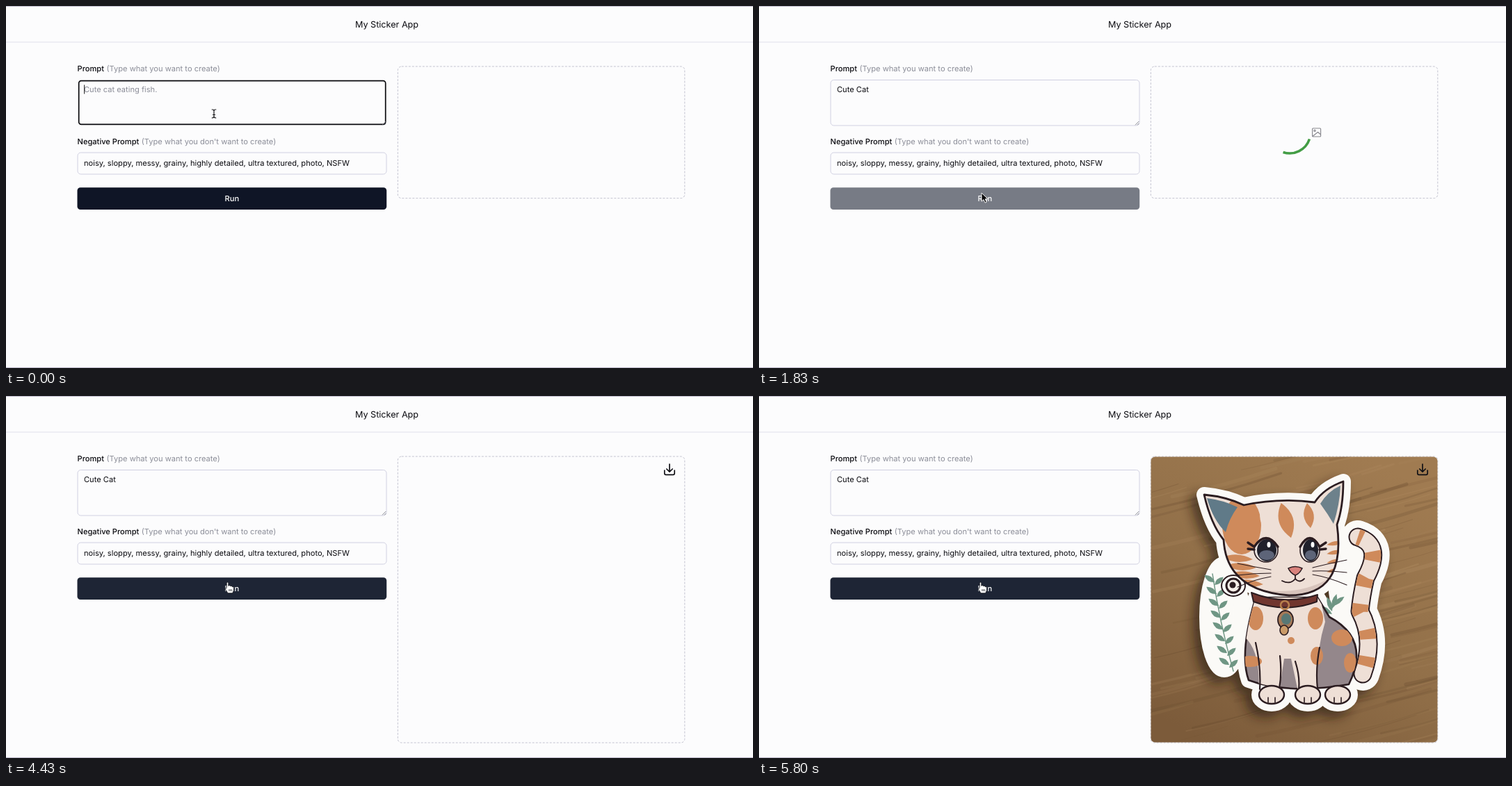
Write an HTML page that moves like this. It is 1074 px wide and 521 px high and loops after 5.83 s.

```html
<!DOCTYPE html>
<html lang="en">
<head>
<meta charset="utf-8">
<title>My Sticker App</title>
<style>
  html, body { margin: 0; width: 100%; height: 100%; overflow: hidden; background: #fcfcfd; }
  svg { display: block; width: 100vw; height: 100vh; }
  text { font: 400 11.12px Inter, "Liberation Sans", sans-serif; fill: #0b0b10; white-space: pre; text-rendering: geometricPrecision; }
  .title { font-size: 12.64px; }
  .label, .run { font-weight: 500; }
  .hint { fill: #8b8d98; }
  .run { fill: #fff; }
  .mid { text-anchor: middle; }
  .line { fill: none; stroke-linecap: round; stroke-linejoin: round; }
  .box { fill: none; stroke: #d0d0e1; }
</style>
</head>
<body>
<svg id="stage" viewBox="0 0 1074 521"></svg>
<script>
const LOOP = 5830;
const PROMPT = "Cute Cat";
const TYPE_START = 100, TYPE_END = 720;
const MOVE_START = 760, MOVE_END = 1082;
const CLICK = 1213, RESULT = 3320, IMAGE = 5040;
const SPIN = 475;

const INK = "#2b1c20", CREAM = "#eedfd6", ORANGE = "#cf8a5b", GREY = "#94878b", GREEN = "#6f9684";
const HEAD = "M640 142Q672 145 697 157Q748 146 799 153Q812 133 840 123Q840 160 831 185Q845 287 762 287Q672 280 668 207Q650 185 640 142Z";
const BODY = "M714 290Q690 370 704 409Q760 430 848 415Q880 350 820 318L803 290Z";
const TAIL = "M868 400Q886 350 864 310Q866 288 872 262Q898 215 861 203";
const PAWS = [737, 789, 832];

const path = (d, fill, extra = "") => `<path d="${d}" fill="${fill}" ${extra}/>`;
const line = (d, color, width, extra = "") =>
  `<path class="line" d="${d}" stroke="${color}" stroke-width="${width}" ${extra}/>`;
const oval = (x, y, rx, ry, fill, extra = "") =>
  `<ellipse cx="${x}" cy="${y}" rx="${rx}" ry="${ry}" fill="${fill}" ${extra}/>`;
const label = (x, y, cls, str) => `<text x="${x}" y="${y}" class="${cls}">${str}</text>`;
const repeat = (n, make) => Array.from({ length: n }, (_, i) => make(i)).join("");
const outline = w => `stroke="${INK}" stroke-width="${w}" stroke-linejoin="round"`;

// Pointed blade, used for leaves and fur stripes.
const blade = (x, y, angle, size, color, fat = 0.4) =>
  path(`M0 0Q${size / 2} ${-size * fat} ${size} 0Q${size / 2} ${size * fat} 0 0`, color,
    `transform="translate(${x} ${y}) rotate(${angle})"`);

function random(seed) {
  return () => (seed = (seed * 16807) % 2147483647) / 2147483647;
}

function wood() {
  const rnd = random(77);
  return `<rect x="563" y="87" width="413" height="412" fill="url(#wood)"/>` + repeat(110, () => {
    const x = 500 + rnd() * 440, y = 90 + rnd() * 500, w = 70 + rnd() * 180;
    const color = rnd() < 0.5 ? "#5e4329" : "#b8946a";
    return line(`M${x} ${y}q${w / 2} ${-w * 0.1} ${w} ${-w * 0.27}`, color, 1 + rnd() * 5,
      `opacity="${0.08 + rnd() * 0.18}"`);
  });
}

// The die-cut border is the cat's silhouette, widened.
function cutout(color, extra = "") {
  return `<g fill="${color}" stroke="${color}" stroke-width="22" stroke-linejoin="round" ${extra}>
    <path d="${HEAD}"/><path d="${BODY}"/>${line(TAIL, color, 48)}
    ${PAWS.map(x => oval(x, 430, 18, 13, color)).join("")}
    ${oval(669, 318, 25, 76, color)}${oval(845, 260, 16, 60, color)}</g>`;
}

function leaves() {
  const stem = repeat(8, i => blade(655 + i * 3, 268 + i * 17, 215, 18, GREEN) +
    blade(655 + i * 3, 272 + i * 17, -42, 17, GREEN));
  const sprig = repeat(4, i => blade(824, 314 - i * 4, 215 + i * 36, 22, GREEN, 0.3));
  return line("M652 256Q662 325 682 396", GREEN, 1.5) + stem + sprig;
}

function paw(x) {
  return oval(x, 430, 18, 13, CREAM, outline(2.4)) +
    repeat(2, i => line(`M${x - 5 + i * 10} 434v7`, INK, 1.6));
}

function body() {
  return line(TAIL, INK, 27) + line(TAIL, CREAM, 23) +
    line(TAIL, ORANGE, 23, `stroke-dasharray="14 25" stroke-dashoffset="-12" style="stroke-linecap:butt"`) +
    path(BODY, GREY, outline(2.6)) +
    `<g clip-path="url(#body)">` +
    oval(838, 348, 15, 12, ORANGE) + oval(850, 384, 9, 14, ORANGE) +
    path("M704 280L696 345Q722 365 718 425H748L755 378H765L775 425H803Q800 370 814 325L805 280Z", CREAM) +
    oval(714, 320, 11, 17, ORANGE) + oval(800, 320, 11, 16, ORANGE) +
    oval(802, 374, 9, 13, ORANGE) + oval(706, 382, 17, 8, ORANGE) + oval(765, 352, 5, 5, ORANGE) +
    `</g>` +
    line("M714 355Q722 390 720 422M749 374Q752 400 748 421M771 382Q778 404 776 422M806 362Q800 393 803 421", INK, 2.2) +
    PAWS.map(paw).join("");
}

function collar() {
  return path("M708 283Q755 302 803 286L802 296Q757 313 711 296Z", "#71362f", outline(2)) +
    oval(756, 301, 6, 6, "none", `stroke="#b8814c" stroke-width="2.5"`) +
    oval(757, 322, 11, 13, "#a67a58", outline(1.8)) + oval(758, 321, 7, 8, "#587875") +
    oval(755, 337, 6, 7, "#c99a68", outline(1.6));
}

function eye(x, rx, side) {
  return oval(x, 222, rx, 17, "#e9e2df", outline(1.6)) +
    oval(x + 1, 222, rx - 3, 16, "#20212c") + oval(x + 1, 229, rx - 6, 7, "#5d6478") +
    oval(x + 4, 214, 2.5, 4, "#fff") +
    line(`M${x - rx} 217Q${x} 192 ${x + rx} 217m0 0M${x + side * rx} 217l${side * 9} -6m${-side * 9} 10l${side * 9} -1`, INK, 3.4);
}

function whiskers() {
  return repeat(3, i => line(`M736 ${250 + i * 5}Q712 ${246 + i * 9} 688 ${241 + i * 17}` +
    `M796 ${247 + i * 5}Q820 ${241 + i * 10} 845 ${236 + i * 18}`, INK, 1.2));
}

function head() {
  return path(HEAD, CREAM) + `<g clip-path="url(#head)">` +
    oval(694, 186, 28, 42, ORANGE) +
    blade(765, 204, -106, 52, ORANGE) + blade(732, 196, -100, 40, CREAM) + blade(793, 190, -98, 36, ORANGE) +
    repeat(4, i => blade(666 + i * 5, 232 + i * 12, 4, 44, ORANGE, 0.24) + blade(840, 210 + i * 13, 170, 24, ORANGE, 0.24)) +
    line("M700 278Q770 298 826 264", "#c9b3ac", 9, `opacity=".6"`) + `</g>` +
    path("M644 147Q668 150 688 160Q676 176 671 196Q653 179 644 147Z", "#607a88") +
    path("M836 129Q818 137 807 155Q818 170 826 184Q835 156 836 129Z", "#6d818b") +
    path(HEAD, "none", outline(2.8)) +
    eye(729, 17, -1) + eye(792, 14, 1) +
    path("M761 248Q771 243 781 248Q777 256 771 258Q764 255 761 248Z", "#d9827c", outline(1.6)) +
    line("M771 258v5Q764 272 752 266M771 263Q777 270 784 263", INK, 1.8) + whiskers();
}

function sticker() {
  return cutout("#24150b", `opacity=".6" transform="translate(-9 9)" filter="url(#soft)"`) +
    cutout("#fbfaf7") + leaves() +
    oval(682, 273, 17, 15, "#fbfaf7", outline(2)) + oval(682, 273, 10, 10, "#f6eee8", outline(3)) +
    oval(681, 272, 4.5, 4.5, INK) + body() + collar() + head();
}

const stage = document.getElementById("stage");
stage.innerHTML = `
<defs>
  <linearGradient id="wood" x1=".75" y1="0" x2=".2" y2="1">
    <stop offset="0" stop-color="#a07b51"/><stop offset=".5" stop-color="#927049"/><stop offset="1" stop-color="#7c5b3a"/>
  </linearGradient>
  <filter id="soft" x="-20%" y="-20%" width="140%" height="140%"><feGaussianBlur stdDeviation="8"/></filter>
  <clipPath id="card"><rect x="563.5" y="87.5" width="412" height="411" rx="6"/></clipPath>
  <clipPath id="head"><path d="${HEAD}"/></clipPath>
  <clipPath id="body"><path d="${BODY}"/></clipPath>
</defs>
<rect width="1074" height="521" fill="#fcfcfd"/>
<path d="M0 .5H1074M0 520.5H1074" stroke="#bdb9cb"/>
<path d="M0 52H1074" stroke="#e1e2ec" stroke-width="1.2"/>
${label(547.5, 30.7, "title mid", "My Sticker App")}
${label(102.5, 94, "label", "Prompt")}
${label(144.5, 94, "hint", "(Type what you want to create)")}
${label(102.5, 199, "label", "Negative Prompt")}
${label(194.8, 199, "hint", "(Type what you don't want to create)")}
<rect id="field" class="box" x="103" y="106.5" width="444" height="65.5" rx="4.5"/>
<rect id="ring" x="104.7" y="107.7" width="441" height="62.6" rx="3.5" fill="none" stroke="#08080c" stroke-width="1.7"/>
<path d="M541 171.3L546.3 166M544 171.3L546.3 169" stroke="#777984" stroke-width=".9"/>
<text id="prompt" x="112" y="124"></text>
<path id="caret" d="M112.7 113.5V126.5" stroke="#111"/>
<rect class="box" x="103" y="211" width="444" height="31" rx="4.5"/>
${label(112, 230.3, "", "noisy, sloppy, messy, grainy, highly detailed, ultra textured, photo, NSFW")}
<rect id="button" x="102.5" y="261.3" width="444.7" height="31.8" rx="4.5"/>
${label(324.8, 281.2, "run mid", "Run")}
<rect id="panel" x="563.3" y="87" width="412.5" rx="5.5" fill="none" stroke="#c3c3d0" stroke-dasharray="3 2"/>
<g id="loader">
  <path id="arc" d="M784.2 160.8A30 30 0 0 1 784.2 203.2" fill="none" stroke="#439d45" stroke-width="3.6"/>
  <g class="line" stroke="#85858c" stroke-width="1.1">
    <rect x="795.6" y="176" width="12" height="12" rx="1"/>
    <circle cx="799" cy="179.6" r="1.2"/><path d="M796 187.5L803.5 181.5L807.5 185"/>
  </g>
</g>
<g id="image" clip-path="url(#card)">${wood()}${sticker()}</g>
<g id="save">${line("M954 98V109M949.8 105L954 109.2L958.2 105M946.8 107V111.2Q946.8 113.3 949 113.3H959Q961.2 113.3 961.2 111.2V107", "#111116", 1.7)}</g>
<g id="beam">${line("M-2.8 -6Q0 -6 0 -4Q0 -6 2.8 -6M0 -4V4M-2.8 6Q0 6 0 4Q0 6 2.8 6M-1.5 1.5H1.5", "#18181b", 1.2)}</g>
<g id="arrow"><path d="M0 0V12.2L2.9 9.6L5 14.2L7.2 13.2L5.2 8.8H9Z" fill="#060608" stroke="#fff" stroke-width=".9"/></g>
<g id="hand"><path d="M-2.8 6.6V.6Q-2.8 -1 -1.5 -1Q-.3 -1 -.2 .6V4.2Q1.8 2.8 2.6 4.6Q4.6 3.6 5.1 5.4Q7.4 4.9 7.4 7.2V10Q7 12.5 5.6 14.8H-1.2Q-2.4 11.8 -4.6 9.4Q-5.6 6.6 -2.8 8.2" fill="#fff" stroke="#15171e" stroke-width=".9"/><path d="M.8 9V12M2.6 9V12M4.4 9V12" stroke="#15171e" stroke-width=".7"/></g>`;

const el = {};
stage.querySelectorAll("[id]").forEach(node => el[node.id] = node);
const show = (name, on) => el[name].style.display = on ? "" : "none";
const progress = (t, from, to) => Math.max(0, Math.min(1, (t - from) / (to - from)));

// Eased move from the prompt field down to the button, along a shallow arc.
function pointer(t) {
  const v = progress(t, MOVE_START, MOVE_END);
  const u = v * v * (3 - 2 * v);
  const bend = (a, b, c) => (1 - u) ** 2 * a + 2 * u * (1 - u) * b + u * u * c;
  return [bend(299, 339, 320), bend(155, 235, 269)];
}

function draw(t) {
  const typed = Math.ceil(PROMPT.length * progress(t, TYPE_START, TYPE_END));
  const focused = t < CLICK;
  const done = t >= RESULT;
  const loading = !focused && !done;

  el.prompt.textContent = typed ? PROMPT.slice(0, typed) : "Cute cat eating fish.";
  el.prompt.setAttribute("class", typed ? "" : "hint");
  show("ring", focused);
  show("field", !focused);
  show("caret", t < 900);
  const end = typed ? el.prompt.getComputedTextLength() : 0;
  el.caret.setAttribute("transform", `translate(${end} 0)`);

  const [x, y] = pointer(t);
  const overButton = y > 261;
  const overField = y < 172 || (y > 211 && y < 242);
  const hidden = typed > 0 && t < MOVE_START;
  const kind = hidden ? "" : overField ? "beam" : overButton && !loading ? "hand" : "arrow";
  for (const name of ["beam", "arrow", "hand"]) {
    show(name, name === kind);
    el[name].setAttribute("transform", `translate(${x} ${y})`);
  }

  el.button.setAttribute("fill", loading ? "#777b85" : overButton ? "#1e2535" : "#0f1526");
  show("loader", loading);
  el.arc.setAttribute("transform", `rotate(${(t - CLICK) / SPIN * 360 - 45} 763 182)`);
  el.panel.setAttribute("height", done ? 412 : 189.7);
  show("image", t >= IMAGE);
  show("save", done);
}

const start = performance.now();
function tick() {
  draw((performance.now() - start) % LOOP);
  requestAnimationFrame(tick);
}
tick();
</script>
</body>
</html>
```
